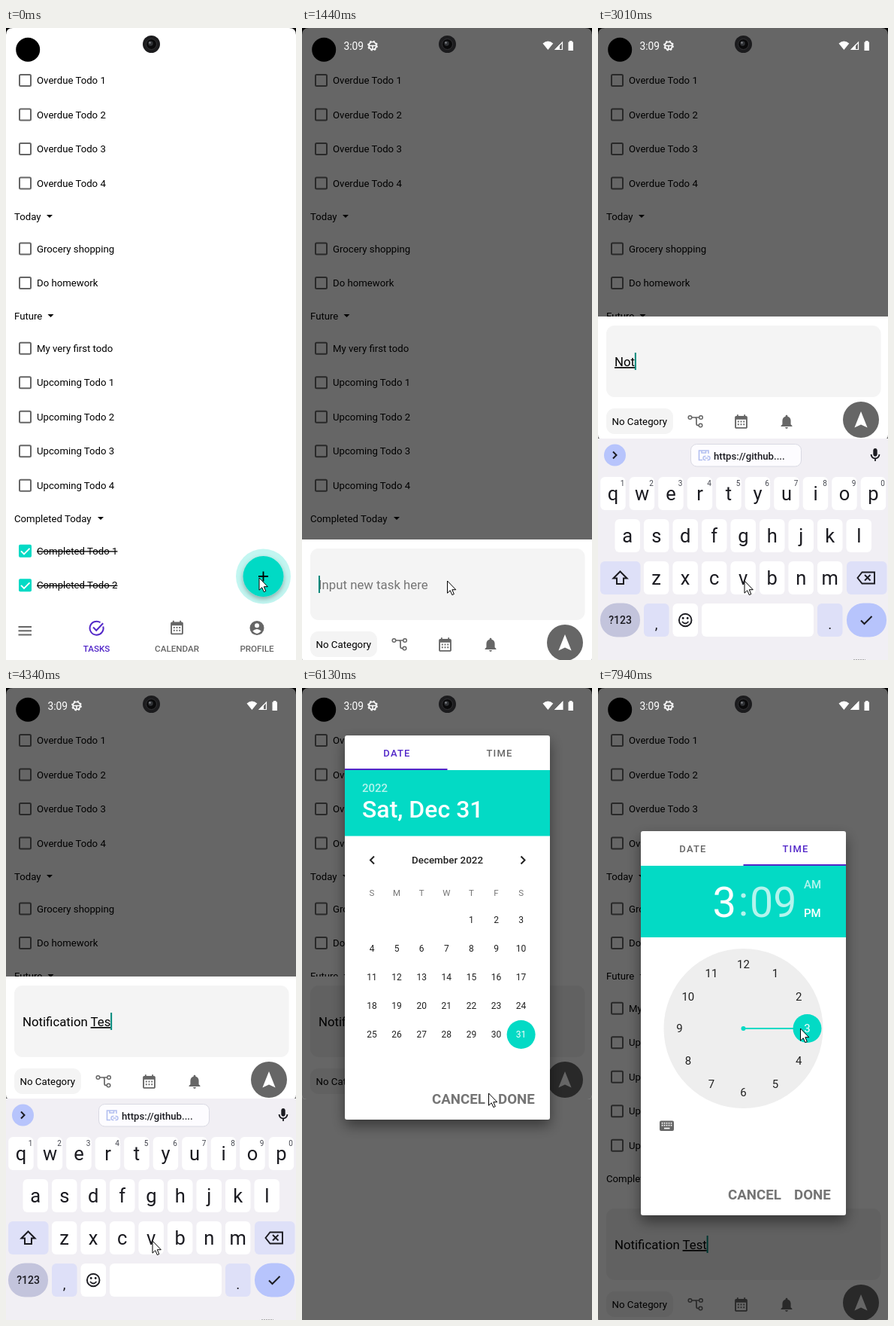
An HTML page for the animation above (8000 ms loop, 386x839 px).

```html
<!DOCTYPE html>
<html lang="en">
<head>
<meta charset="utf-8">
<title>Adding a task</title>
<style>
  html, body { margin: 0; width: 100%; height: 100%; overflow: hidden; background: #fff; }
  svg { display: block; font-family: Roboto, "Noto Sans", sans-serif; }
  text { white-space: pre; }
</style>
</head>
<body>
<svg id="stage" width="386" height="839" viewBox="0 0 386 839"></svg>
<script>
const LOOP = 8000;
const TEAL = '#03dac5', PURPLE = '#5227c8', GREY = '#666';

// ---- drawing helpers ----
const text = (x, y, s, size, o = {}) =>
  `<text x="${x}" y="${y}" font-size="${size}" fill="${o.fill || '#000'}" font-weight="${o.weight || 400}"
    text-anchor="${o.anchor || 'start'}" opacity="${o.opacity || 1}" letter-spacing="${o.spacing || 0}"
    text-decoration="${o.deco || 'none'}" ${o.id ? `id="${o.id}"` : ''}>${s}</text>`;
const mid = (x, y, s, size, o = {}) => text(x, y, s, size, { ...o, anchor: 'middle' });
const rect = (x, y, w, h, fill, rx = 0, extra = '') =>
  `<rect x="${x}" y="${y}" width="${w}" height="${h}" fill="${fill}" rx="${rx}" ${extra}/>`;
const dot = (x, y, r, fill, extra = '') => `<circle cx="${x}" cy="${y}" r="${r}" fill="${fill}" ${extra}/>`;
const line = (d, color, w = 2, extra = '') =>
  `<path d="${d}" fill="none" stroke="${color}" stroke-width="${w}" ${extra}/>`;
const shape = (d, fill, extra = '') => `<path d="${d}" fill="${fill}" ${extra}/>`;
const icon = (x, y, scale, d, fill = GREY) =>
  `<g transform="translate(${x} ${y}) scale(${scale}) translate(-12 -12)">${shape(d, fill, 'fill-rule="evenodd"')}</g>`;
const group = (id, body, extra = '') => `<g id="${id}" ${extra}>${body}</g>`;

const CALENDAR = 'M19 4h-1V2h-2v2H8V2H6v2H5c-1.1 0-2 .9-2 2v14c0 1.1.9 2 2 2h14c1.1 0 2-.9 2-2V6c0-1.1-.9-2-2-2zm0 16H5V9h14zM7 11h2v2H7zm4 0h2v2h-2zm4 0h2v2h-2zM7 15h2v2H7zm4 0h2v2h-2zm4 0h2v2h-2z';
const BELL = 'M12 22c1.1 0 2-.9 2-2h-4c0 1.1.9 2 2 2zm6-6v-5c0-3.07-1.63-5.64-4.5-6.32V4c0-.83-.67-1.5-1.5-1.5s-1.5.67-1.5 1.5v.68C7.64 5.36 6 7.92 6 11v5l-2 2v1h16v-1l-2-2z';
const MIC = 'M12 14c1.66 0 3-1.34 3-3V5c0-1.66-1.34-3-3-3S9 3.34 9 5v6c0 1.66 1.34 3 3 3zm5-3c0 2.76-2.24 5-5 5s-5-2.24-5-5H5c0 3.53 2.61 6.43 6 6.92V21h2v-3.08c3.39-.49 6-3.39 6-6.92z';

// ---- task list ----
function todo(y, label, done) {
  const box = done
    ? rect(17, y - 8.5, 17, 17, TEAL, 2) + line(`M20 ${y}l4 4 7.5-7.5`, '#fff', 1.9)
    : rect(18, y - 7.5, 15, 15, 'none', 1.5, `stroke="${GREY}" stroke-width="2"`);
  return box + text(41, y + 4.6, label, 13.2, { deco: done ? 'line-through' : 'none' });
}
const heading = (y, label, arrow) =>
  text(11, y + 4.6, label, 13.2) + shape(`M${arrow - 4} ${y - 2}h8l-4 4z`, '#000');

function taskPage() {
  const rows = (y, labels, done) => labels.map((s, i) => todo(y + i * 45.5, s, done)).join('');
  const numbered = (s, n) => Array.from({ length: n }, (_, i) => `${s} Todo ${i + 1}`);
  const tab = (x, s, fill) => mid(x, 828, s, 11.6, { fill, weight: 500 });
  return rows(69.5, numbered('Overdue', 4)) +
    heading(250, 'Today', 58) + rows(293, ['Grocery shopping', 'Do homework']) +
    heading(382, 'Future', 59.5) + rows(425.3, ['My very first todo', ...numbered('Upcoming', 4)]) +
    heading(651, 'Completed Today', 126) + rows(694.3, numbered('Completed', 2), true) +
    line('M16.5 795h17.5M16.5 800.3h17.5M16.5 805.6h17.5', GREY) +
    line('M125.5 789.2A9 9 0 1 0 129.3 794.5M116 795.5l4.2 4.2 9-9.5', PURPLE, 2) +
    tab(120.5, 'TASKS', PURPLE) +
    icon(227.5, 796, .93, CALENDAR) + tab(227.5, 'CALENDAR', GREY) +
    dot(334, 796.5, 9.5, GREY) + dot(334, 793.2, 3, '#fff') +
    shape('M328.3 800.6q5.7-5 11.4 0q-5.7 6.6-11.4 0z', '#fff') + tab(334, 'PROFILE', GREY) +
    dot(342.5, 728, 36.5, TEAL, 'id="ring"') +
    dot(342.5, 728, 27, TEAL, 'filter="url(#soft)"') +
    line('M336 728h13M342.5 721.5v13', '#000', 1.8);
}

// ---- new task sheet, top edge at y = 0 ----
const sheetShape = 'M0 0H386V157q0 6-6 6H6q-6 0-6-6z';
const sheet = () =>
  shape(sheetShape, '#fff') +
  rect(11, 12, 365.5, 95, '#f4f4f4', 11) +
  text(22, 66, 'Input new task here', 16.8, { fill: '#757575', id: 'hint' }) +
  `<text id="typed" x="22" y="66" font-size="16.8"><tspan id="plain"></tspan><tspan id="word" text-decoration="underline"></tspan></text>` +
  rect(22, 48, 2, 23, '#00897b', 0, 'id="caret"') +
  rect(11, 122, 89, 34, '#f4f4f4', 11) + text(18.5, 144.3, 'No Category', 13.3) +
  line('M123 134h6q2 0 2 2.5v5.5q0 2.500 2 2.500h1.500M126 134h8', GREY, 1.7) +
  ['122.500,134', '137,134', '136.500,144.500'].map(p => dot(...p.split(','), 2.300, '#fff', `stroke="${GREY}" stroke-width="1.500"`)).join('') +
  icon(190.5, 139.5, .93, CALENDAR) + icon(251, 139.5, .93, BELL) +
  dot(350, 137, 24, GREY) + shape('M350 126l8.600 21.500-8.600-4-8.600 4z', '#fff') +
  shape(sheetShape, '#000', 'id="sheetDim"');

// ---- keyboard ----
function keyboard() {
  const INK = '#1b1b21', PALE = '#dee0f8', BLUE = '#b7c4fc';
  const row = (letters, x, y, digits) => [...letters].map((c, i) => {
    const cx = x + i * 38.5;
    return rect(cx - 16.8, y, 33.5, 44, '#fff', 6) + mid(cx, y + 30.5, c, 25.5, { fill: INK }) +
      (digits ? mid(cx + 12.5, y + 11.8, (i + 1) % 10, 10, { fill: '#44464f' }) : '');
  }).join('');
  return rect(0, 545, 386, 294, '#f1eff4') +
    dot(22.5, 567, 14.5, BLUE) + line('M20 562.500l4.500 4.500-4.500 4.500', INK, 2) +
    rect(123.500, 552.500, 147, 29.500, '#fdfcff', 8, 'stroke="#d9d9e3"') +
    line('M139 573.500h-4.500v-12.500h12.500v4M138 561h5.500v3h-5.500z', '#b3bff0', 1.6) +
    line('M143.500 568.500h-1a2.500 2.500 0 0 0 0 5h1M145.500 568.500h1a2.500 2.500 0 0 1 0 5h-1M142.500 571h4', '#b3bff0', 1.4) +
    text(154, 572.5, 'https://github....', 13.2, { weight: 500, fill: INK }) +
    icon(369, 567, .9, MIC, INK) +
    row('qwertyuiop', 20, 596, true) + row('asdfghjkl', 39.3, 652) + row('zxcvbnm', 77.7, 708) +
    rect(3, 708, 53.5, 44, PALE, 6) + line('M29.500 721.500l9 9h-4.500v7.500h-9v-7.500h-4.500z', INK, 2) +
    rect(331, 708, 53.5, 44, PALE, 6) +
    line('M351.500 722.500h16.500v15h-16.500l-6-7.500zM355 726l7.500 7.500M362.500 726l-7.500 7.500', INK, 1.9) +
    rect(3, 763.5, 53, 45, '#c3c4dc', 22) + mid(29.5, 791.3, '?123', 14, { weight: 500, fill: INK }) +
    rect(61, 764, 33.5, 44, PALE, 6) + mid(77.7, 798, ',', 19, { fill: INK }) +
    rect(99.5, 764, 33.5, 44, '#fff', 6) + dot(116.2, 786, 8.3, 'none', `stroke="${INK}" stroke-width="1.900"`) +
    dot(113.2, 783.5, 1.4, INK) + dot(119.2, 783.5, 1.4, INK) + line('M112 788q4.200 5 8.400 0', INK, 1.8) +
    rect(138, 764, 149, 44, '#fff', 6) +
    rect(292, 764, 33.5, 44, PALE, 6) + mid(308.7, 798, '.', 19, { fill: INK }) +
    rect(331, 763.5, 53, 45, BLUE, 22) + line('M350 786.500l4.500 4.500 10-10', INK, 2) +
    line('M340 838.500h16', '#aaa', 1, 'stroke-dasharray="2 1"');
}

// ---- date and time dialog, top edge at y = 0 ----
function datePage() {
  const col = i => 93 + i * 33.1;
  const days = Array.from({ length: 31 }, (_, i) => {
    const cell = i + 4, x = col(cell % 7), y = 245 + Math.floor(cell / 7) * 38;
    const on = i === 30;
    return (on ? dot(x, y + 152 - 152, 19, TEAL) : '') +
      mid(x, y + 4.3, i + 1, 12, { fill: on ? '#fff' : '#212121' });
  }).join('');
  return rect(57, 46, 273, 87.5, TEAL) +
    text(80, 75, '2022', 15, { fill: '#fff', weight: 500, opacity: .7 }) +
    text(80, 108.5, 'Sat, Dec 31', 32, { fill: '#fff', weight: 500 }) +
    line('M96 160.500l-5 5 5 5M291.500 160.500l5 5-5 5', '#212121', 2) +
    mid(193.5, 170, 'December 2022', 13.4, { weight: 500, fill: '#212121' }) +
    [...'SMTWTFS'].map((s, i) => mid(col(i), 213, s, 11.5, { fill: '#757575' })).join('') + days;
}
function timePage() {
  const cx = 193.5, cy = 262;
  const hours = Array.from({ length: 12 }, (_, i) => {
    const h = i + 1, a = h * Math.PI / 6;
    return mid(cx + 85 * Math.sin(a), cy - 85 * Math.cos(a) + 5.3, h, 15, { fill: h === 3 ? '#fff' : '#212121' });
  }).join('');
  const keys = [0, 1, 2, 3, 4].map(i => rect(84.700 + i * 3, 386.800, 1.700, 1.700, '#fff') + rect(84.700 + i * 3, 389.800, 1.700, 1.700, '#fff')).join('');
  const big = { fill: '#fff' }, faint = { fill: '#fff', opacity: .7 };
  return `<g transform="translate(273 0)">` + rect(57, 46, 273, 95, TEAL) +
    text(152.5, 114, '3', 56, big) + mid(193.5, 112, ':', 56, faint) + text(202, 114, '09', 55.5, faint) +
    text(274, 76, 'AM', 15, { ...faint, weight: 500 }) + text(274, 114, 'PM', 15, { ...big, weight: 500 }) +
    dot(cx, cy, 106, '#eee') + line(`M${cx} ${cy}h85`, TEAL, 2) + dot(cx, cy, 3, TEAL) +
    dot(cx + 85, cy, 19, TEAL) + hours +
    rect(82, 384.500, 19, 13.500, GREY, 2) + keys + rect(88, 393.700, 7.500, 1.700, '#fff') + '</g>';
}
const dialog = () =>
  rect(57, 0, 273, 510, '#fff', 3, 'filter="url(#deep)"') +
  `<g clip-path="url(#pages)">${group('pager', datePage() + timePage())}</g>` +
  mid(126.5, 28.3, 'DATE', 13, { weight: 500, spacing: 1.2, id: 'dateTab' }) +
  mid(263, 28.3, 'TIME', 13, { weight: 500, spacing: 1.2, id: 'timeTab' }) +
  rect(57, 44, 136.5, 2, PURPLE, 0, 'id="mark"') +
  text(173, 489, 'CANCEL', 18.7, { weight: 700, fill: '#757575' }) +
  text(261, 489, 'DONE', 18.7, { weight: 700, fill: '#757575' });

// ---- device bezel and status bar ----
const status = () =>
  text(55.5, 28.6, '3:09', 13.8, { fill: '#fff' }) +
  dot(94, 23.5, 5, 'none', 'stroke="#fff" stroke-width="1.700"') +
  dot(94, 23.5, 6.3, 'none', 'stroke="#fff" stroke-width="1.200" stroke-dasharray="2.500 2.450"') +
  line('M89.500 23.500h9M94 23.500v5', '#fff', 1.5) +
  shape('M320.500 20.500q6.900-5.800 13.800 0l-6.900 8.500z', '#fff') +
  line('M337.500 28.500h9v-9.500z', '#fff', 1.2) +
  shape('M336 29l7-7.300v7.300z', '#fff') +
  shape('M336 29h11.500v-12z', '#fff', 'id="signal"') +
  shape('M356 17h3.500v1.500h1.500v11.500h-6.500v-11.500h1.500z', '#fff') +
  dot(29.2, 28.7, 16, '#000') +
  dot(193.5, 21.5, 11.5, '#1c1c1e') + dot(193.5, 21.5, 7, '#0a0a0b', 'stroke="#343437"') +
  dot(192.5, 20.5, 3.2, '#303236') + dot(191.5, 19.5, 1.2, '#85888c') +
  shape('M0 0h9q-9 0-9 9zM386 0h-9q9 0 9 9z', '#000');

const stage = document.getElementById('stage');
stage.innerHTML = `<defs>
  <filter id="soft" x="-30%" y="-30%" width="160%" height="170%"><feDropShadow dx="0" dy="3" stdDeviation="3" flood-opacity=".3"/></filter>
  <filter id="deep" x="-20%" y="-10%" width="140%" height="125%"><feDropShadow dx="0" dy="8" stdDeviation="9" flood-opacity=".45"/></filter>
  <clipPath id="pages"><rect x="57" y="46" width="273" height="420"/></clipPath>
</defs>` +
  rect(0, 0, 386, 839, '#fff') + taskPage() +
  rect(0, 0, 386, 839, '#000', 0, 'id="scrim"') +
  rect(0, 540, 386, 299, '#666', 0, 'id="gap"') +
  group('sheet', sheet()) + group('keys', keyboard()) + group('dialog', dialog()) + status() +
  dot(0, 0, 12, '#ffee20', 'id="click"') +
  group('cursor', shape('M0 0V16.200L3.700 12.700 6.300 18.600 8.800 17.500 6.300 11.700H11.300z', '#fff', 'stroke="#000" stroke-width="1"'));

const el = {};
stage.querySelectorAll('[id]').forEach(n => el[n.id] = n);

// ---- timeline ----
const ramp = (t, a, b) => Math.min(1, Math.max(0, (t - a) / (b - a)));
const smooth = p => p * p * (3 - 2 * p);
const within = (t, a, b) => t >= a && t < b;

const path = [ // time, x, y
  [0, 337, 730], [560, 337, 730], [830, 287, 725], [1360, 193, 734], [1600, 195, 734],
  [4680, 195, 734], [5450, 255.5, 526], [5750, 255.5, 526], [6100, 248.5, 538], [6400, 248.5, 538],
  [6800, 264, 201], [7110, 264, 208], [7390, 280, 593], [7560, 280, 593], [7940, 269.5, 452]
];
const clicks = [[5480, 5680], [6850, 7040]];
const strokes = [2650, 2790, 3010, 3110, 3210, 3300, 3400, 3500, 3600, 3700, 3800, 3870, 3940, 4140, 4230, 4320, 4410];
const phrase = 'Notification Test';
const hidden = [[1920, 2390], [4910, 5410], [5540, 6220]];

function pointer(t) {
  const i = path.findIndex(k => k[0] > t);
  if (i < 0) return path[path.length - 1].slice(1);
  const [a, x, y] = path[i - 1], [b, u, v] = path[i], p = smooth(ramp(t, a, b));
  return [x + (u - x) * p, y + (v - y) * p];
}
const set = (n, attrs) => { for (const k in attrs) n.setAttribute(k, attrs[k]); };
const show = (n, on) => set(n, { visibility: on ? 'visible' : 'hidden' });
const move = (n, x, y) => set(n, { transform: `translate(${x} ${y})` });

function draw(t) {
  set(el.ring, { r: 36.5 - 4.5 * ramp(t, 70, 830), opacity: .24 + .2 * ramp(t, 70, 830) });
  set(el.scrim, { opacity: .6 * ramp(t, 600, 900) });

  const raised = within(t, 1600, 6220);
  const rise = ramp(t, 600, 940);
  show(el.gap, raised);
  move(el.sheet, 0, raised ? 383 : 679 + 160 * (1 - rise));
  set(el.sheet, { opacity: rise });

  const n = strokes.filter(s => s <= t).length;
  const split = n > 13 ? 13 : 0;
  el.plain.textContent = phrase.slice(0, split);
  el.word.textContent = phrase.slice(split, n);
  show(el.hint, !n);
  set(el.caret, { x: n ? 21.8 + el.typed.getComputedTextLength() : 22 });
  show(el.caret, t > 1000 && !hidden.some(h => within(t, ...h)));

  const up = smooth(ramp(t, 1530, 1740)), down = ramp(t, 5850, 6060);
  move(el.keys, 0, 294 * (1 - up + down * down));
  show(el.keys, within(t, 1530, 6060));

  const open = ramp(t, 5690, 5900), slide = smooth(ramp(t, 7000, 7300));
  set(el.sheetDim, { opacity: .6 * open });
  set(el.dialog, { opacity: open });
  move(el.dialog, 0, raised ? 63 : 190);
  move(el.pager, -273 * slide, 0);
  set(el.mark, { x: 57 + 136.5 * slide });
  set(el.dateTab, { fill: slide < .5 ? PURPLE : GREY });
  set(el.timeTab, { fill: slide < .5 ? GREY : PURPLE });

  show(el.signal, t >= 5000);
  const [x, y] = pointer(t);
  move(el.cursor, x, y);
  const hit = clicks.some(c => within(t, ...c));
  set(el.click, { cx: x, cy: y, opacity: hit ? .6 : 0 });
}

const start = performance.now();
function tick() {
  draw((performance.now() - start) % LOOP);
  requestAnimationFrame(tick);
}
tick();
</script>
</body>
</html>
```
